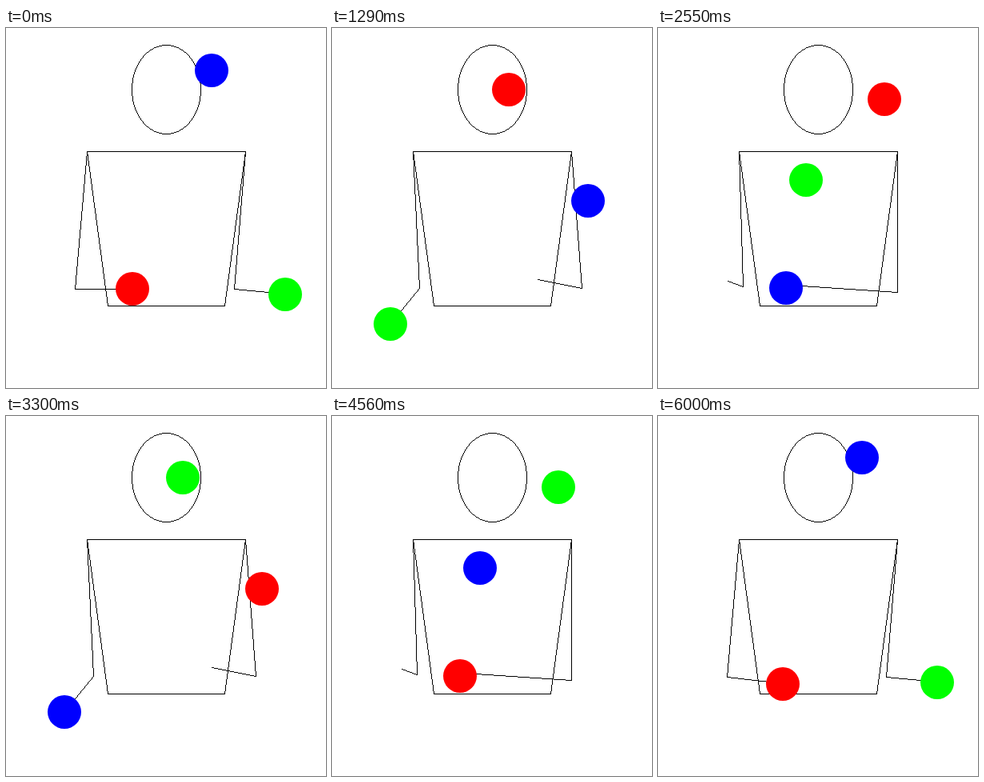
Recreate the animation shown at these times as an HTML page with a canvas. Size 400x450 px, loop 6030 ms.

```html
<!DOCTYPE html>
<html lang="en">
<head>
<meta charset="utf-8">
<title>Three-ball shower</title>
<style>
  html, body { margin: 0; width: 100%; height: 100%; overflow: hidden; background: #fff; }
  canvas { display: block; }
</style>
</head>
<body>
<canvas id="stage" width="400" height="450"></canvas>
<script>
const ctx = document.getElementById('stage').getContext('2d');

// Time is counted in ticks; each ball repeats another's path one cycle later.
const TICK = 30, CYCLE = 67, LOOP = 3 * CYCLE;
const GRAVITY = 0.1431, HIGH = 124, PASS_AT = 13.5, PASS_END = 23.5;
const PASS = PASS_END - PASS_AT;
const RADIUS = 21, ARM = 176, REACH = 127.6;
const LEVEL = 325.6, BALL_DROP = 0.7;

// Points where hands throw and catch, with the hand's velocity there
const leftThrow = { x: 158, y: LEVEL, vx: 183 / HIGH, vy: -GRAVITY * HIGH / 2 };
const rightCatch = { x: 341, y: LEVEL, vx: 0.6, vy: 1.4 };
const rightThrow = { x: 242, y: LEVEL, vx: -182 / PASS, vy: -GRAVITY * PASS / 2 };
const leftCatch = { x: 60, y: LEVEL, vx: -3.56, vy: 0.15 };

const mod = (a, m) => ((a % m) + m) % m;

// Smooth hand move from a to b lasting d ticks
function glide(a, b, d, t) {
  const u = t / d, w = 1 - u;
  const toB = u * u * (3 - 2 * u);
  const va = d * u * w * w, vb = -d * u * u * w;
  return {
    x: a.x + (b.x - a.x) * toB + a.vx * va + b.vx * vb,
    y: a.y + (b.y - a.y) * toB + a.vy * va + b.vy * vb
  };
}

function fly(a, t) {
  return { x: a.x + a.vx * t, y: a.y + a.vy * t + GRAVITY * t * t / 2 };
}

function leftHand(t) {
  const p = mod(t, CYCLE);
  return p < PASS_END
    ? glide(leftThrow, leftCatch, PASS_END, p)
    : glide(leftCatch, leftThrow, CYCLE - PASS_END, p - PASS_END);
}

function rightHand(t) {
  const p = mod(t - PASS_AT, CYCLE);
  const empty = HIGH - CYCLE - PASS_AT;
  return p < empty
    ? glide(rightThrow, rightCatch, empty, p)
    : glide(rightCatch, rightThrow, CYCLE - empty, p - empty);
}

function ballAt(t) {
  const n = mod(t, LOOP), pass = 2 * CYCLE + PASS_AT;
  if (n < HIGH) return fly(leftThrow, n);
  if (n < pass) return rightHand(n);
  if (n < pass + PASS) return fly(rightThrow, n - pass);
  return leftHand(n);
}

// Elbow hangs below and behind the shoulder-hand line, REACH being depth
function elbowOf(s, h) {
  const dx = h.x - s.x, dy = h.y - s.y;
  const out = Math.hypot(dx, REACH), dist = Math.hypot(out, dy);
  const drop = Math.sqrt(ARM * ARM - dist * dist / 4);
  const k = 0.5 - drop * dy / (dist * out);
  return { x: s.x + dx * k, y: s.y + dy / 2 + drop * out / dist };
}

const dot = (x, y) => ctx.fillRect(Math.round(x), Math.round(y), 1, 1);

// Crisp one-pixel line
function line(a, b) {
  const x = Math.round(a.x), y = Math.round(a.y);
  const dx = Math.round(b.x) - x, dy = Math.round(b.y) - y;
  const n = Math.max(Math.abs(dx), Math.abs(dy), 1);
  for (let i = 0; i <= n; i++) dot(x + dx * i / n, y + dy * i / n);
}

function oval(cx, cy, rx, ry) {
  for (let y = -ry; y <= ry; y++) {
    const x = rx * Math.sqrt(1 - y * y / (ry * ry));
    dot(cx - x, cy + y);
    dot(cx + x, cy + y);
  }
  for (let x = -rx; x <= rx; x++) {
    const y = ry * Math.sqrt(1 - x * x / (rx * rx));
    dot(cx + x, cy - y);
    dot(cx + x, cy + y);
  }
}

function disc(p, color) {
  ctx.fillStyle = color;
  ctx.beginPath();
  ctx.arc(Math.round(p.x), Math.round(p.y + BALL_DROP), RADIUS, 0, 2 * Math.PI);
  ctx.fill();
}

const shoulderL = { x: 101, y: 154 }, shoulderR = { x: 299, y: 154 };
const waistL = { x: 127, y: 347 }, waistR = { x: 273, y: 347 };

function arm(shoulder, hand) {
  const elbow = elbowOf(shoulder, hand);
  line(shoulder, elbow);
  line(elbow, hand);
}

function draw(t) {
  ctx.fillStyle = '#fff';
  ctx.fillRect(0, 0, 400, 450);
  ctx.fillStyle = '#000';
  oval(200, 76.5, 43, 55.5);
  line(shoulderL, shoulderR);
  line(shoulderR, waistR);
  line(waistR, waistL);
  line(waistL, shoulderL);
  arm(shoulderL, leftHand(t));
  arm(shoulderR, rightHand(t));
  disc(ballAt(t), '#f00');
  disc(ballAt(t - CYCLE), '#0f0');
  disc(ballAt(t + CYCLE), '#00f');
}

const start = performance.now();
function loop() {
  draw(Math.floor((performance.now() - start) / TICK) % LOOP);
  requestAnimationFrame(loop);
}
loop();
</script>
</body>
</html>
```
